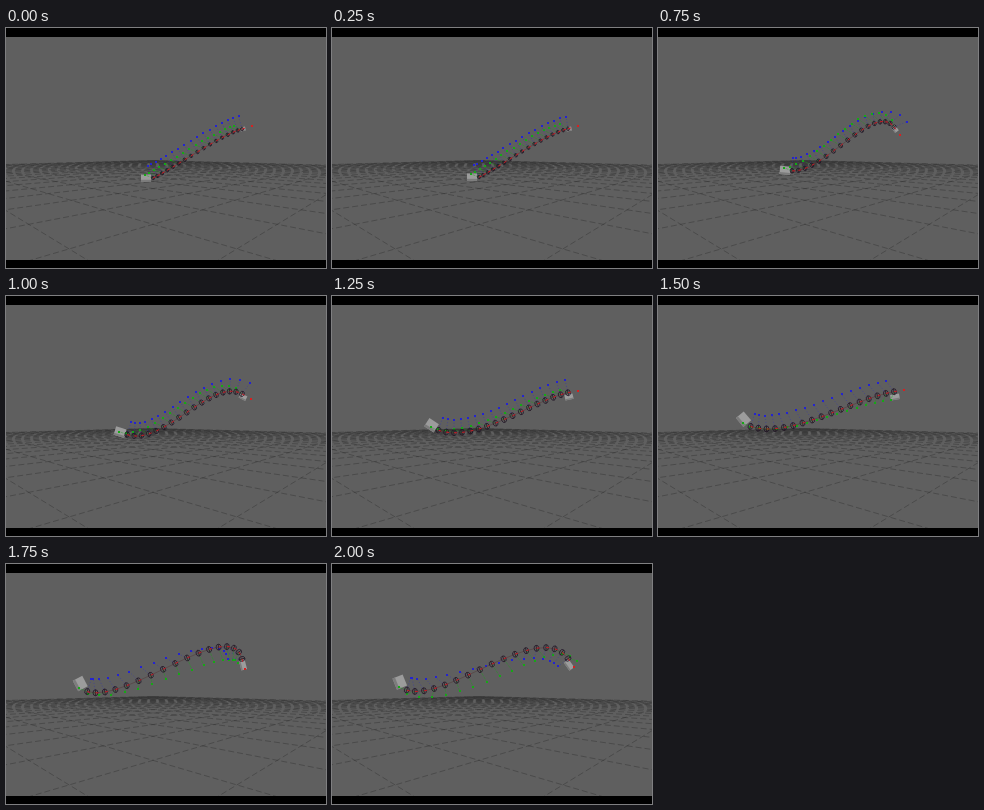
Recreate the animation shown at these times as an HTML page with a canvas. Size 320 by 240 pixels, loop 2050 ms.

```html
<!DOCTYPE html>
<html lang="en">
<head>
<meta charset="utf-8">
<title>Twisting joint chain</title>
<style>
  html, body { margin: 0; width: 100%; height: 100%; overflow: hidden; background: #000; }
  canvas { display: block; width: 320px; height: 240px; }
</style>
</head>
<body>
<canvas id="stage" width="320" height="240"></canvas>
<script>
const LOOP = 2050, FRAMES = 33, JOINTS = 17;
const ctx = document.getElementById('stage').getContext('2d');

const rad = degrees => degrees * Math.PI / 180;
const mix = (a, b, u) => a + (b - a) * u;

// Smooth step from 0 to 1 between two moments.
function ease(t, from, to) {
  const u = Math.max(0, Math.min(1, (t - from) / (to - from)));
  return u * u * (3 - 2 * u);
}

// Value eased through a few [time, value] keys.
function through(keys, t) {
  return keys.slice(1).reduce((value, [time, next], i) =>
    value + (next - keys[i][1]) * ease(t, keys[i][0], time), keys[0][1]);
}

const rightTilt = [[200, -15], [750, 52], [1400, -24], [1800, 82], [2050, 50]];
const endTwist = [[0, 0], [750, -30], [1200, 0], [2050, 190]];

function bezier(p, u) {
  const v = 1 - u;
  const at = c => v * v * v * p[0][c] + 3 * v * v * u * p[1][c] + 3 * v * u * u * p[2][c] + u * u * u * p[3][c];
  const slope = c => v * v * (p[1][c] - p[0][c]) + 2 * v * u * (p[2][c] - p[1][c]) + u * u * (p[3][c] - p[2][c]);
  return { x: at(0), y: at(1), angle: Math.atan2(slope(1), slope(0)) };
}

// The end boxes steer the chain: their tilts set the handles of one curve.
function rig(t) {
  const slide = ease(t, 250, 2100), rise = ease(t, 0, LOOP);
  const left = [mix(147, 74, slide), mix(150, 126, rise)];
  const right = [236, mix(101, 94.5, rise)];
  const a = rad(mix(-25, 18, ease(t, 350, 1000)));
  const tilt = through(rightTilt, t), b = rad(tilt);
  const reachA = mix(23, 42, ease(t, 250, 1250)), reachB = mix(22, 50, t / LOOP);
  return {
    curve: [
      left,
      [left[0] + reachA * Math.cos(a), left[1] + reachA * Math.sin(a)],
      [right[0] - reachB * Math.cos(b), right[1] - reachB * Math.sin(b)],
      right
    ],
    twist: rad(through(endTwist, t)),
    leftBox: [left[0] - 7, left[1] - 8 * ease(t, 600, 1700), mix(10, 12, rise), mix(7, 11, rise), 68 * ease(t, 500, 2000)],
    rightBox: [237, 101, mix(5, 10, rise), mix(4, 6, rise), tilt]
  };
}

function line(g, color, width, x1, y1, x2, y2) {
  g.strokeStyle = color;
  g.lineWidth = width;
  g.beginPath();
  g.moveTo(x1, y1);
  g.lineTo(x2, y2);
  g.stroke();
}

function dot(color, x, y) {
  ctx.fillStyle = color;
  ctx.fillRect(Math.round(x) - 1, Math.round(y) - 1, 2, 2);
}

// Ground plane seen from one unit above it, turned by 45 degrees.
function makeBackdrop() {
  const cv = document.createElement('canvas');
  cv.width = 320;
  cv.height = 240;
  const g = cv.getContext('2d');
  g.fillStyle = '#000';
  g.fillRect(0, 0, 320, 240);
  g.fillStyle = '#5f5f5f';
  g.fillRect(0, 9, 320, 223);
  g.beginPath();
  g.rect(0, 9, 320, 223);
  g.clip();
  g.setLineDash([6, 3]);
  const focal = 240, horizon = 126, far = 37, near = 0.5, cell = 1.25;
  const project = (x, z) => [147 + focal * x / z, horizon + focal / z];
  for (let offset = 0; offset < far - near; offset += cell * Math.SQRT1_2) {
    const z = far - offset, length = z - near;
    for (const side of [-1, 1]) {
      line(g, 'rgba(50,50,50,0.6)', 0.75,
        ...project(side * offset, z),
        ...project(side * (offset - length), z - length));
    }
  }
  return cv;
}

function drawBox([x, y, w, h, angle]) {
  ctx.save();
  ctx.translate(x, y);
  ctx.rotate(rad(angle));
  ctx.fillStyle = '#9c9c9c';
  ctx.fillRect(-w / 2, -h / 2, w, h);
  ctx.fillStyle = '#7c7c7c';
  ctx.fillRect(-w / 2, h / 4, w, h / 4);
  ctx.restore();
}

function drawAxis(color, { x, y }, dx, dy, dash) {
  ctx.setLineDash(dash);
  ctx.globalAlpha = 0.5;
  line(ctx, color, 0.8, x, y, x + dx, y + dy);
  ctx.globalAlpha = 1;
  ctx.setLineDash([]);
  dot(color, x + dx, y + dy);
}

function drawJoint({ x, y, angle }, size) {
  const dx = Math.cos(angle), dy = Math.sin(angle);
  ctx.strokeStyle = 'rgba(30,16,36,0.85)';
  ctx.lineWidth = 0.9;
  ctx.beginPath();
  ctx.ellipse(x, y, size * 0.8, size, angle, 0, 2 * Math.PI);
  ctx.stroke();
  line(ctx, '#241820', 0.8, x + dy * size, y - dx * size, x - dy * size, y + dx * size);
  line(ctx, '#c81c24', 1, x, y, x + dx * 3, y + dy * 3);
}

function drawChain({ curve, twist }, t) {
  const joints = Array.from({ length: JOINTS }, (_, i) => bezier(curve, i / (JOINTS - 1)));
  joints.forEach((joint, i) => {
    const roll = twist * (i / (JOINTS - 1)) ** 0.75;
    const c = Math.cos(roll), s = Math.sin(roll);
    const nx = 13 * Math.sin(joint.angle), ny = -13 * Math.cos(joint.angle);
    const depthX = -8, depthY = -3;
    drawAxis('#2424d0', joint, nx * c + depthX * s, ny * c + depthY * s, [1, 2]);
    drawAxis('#16a816', joint, depthX * c - nx * s, depthY * c - ny * s, [3, 1]);
  });
  joints.forEach((joint, i) => {
    const next = joints[i + 1];
    if (next) line(ctx, 'rgba(80,45,45,0.5)', 0.8, joint.x, joint.y, next.x, next.y);
    drawJoint(joint, mix(1.8, 3, ease(t, 300, 1300)));
  });
  const end = joints[JOINTS - 1];
  dot('#d82020', end.x + 10 * Math.cos(end.angle), end.y + 10 * Math.sin(end.angle));
}

const backdrop = makeBackdrop();

function draw(now) {
  const step = Math.floor((now % LOOP + 12) * FRAMES / LOOP) % FRAMES;
  const t = step * LOOP / FRAMES, pose = rig(t);
  ctx.drawImage(backdrop, 0, 0);
  drawBox(pose.leftBox);
  drawBox(pose.rightBox);
  drawChain(pose, t);
}

let start;
function tick(now) {
  start ??= now;
  draw(now - start);
  requestAnimationFrame(tick);
}
draw(0);
requestAnimationFrame(tick);
</script>
</body>
</html>
```
